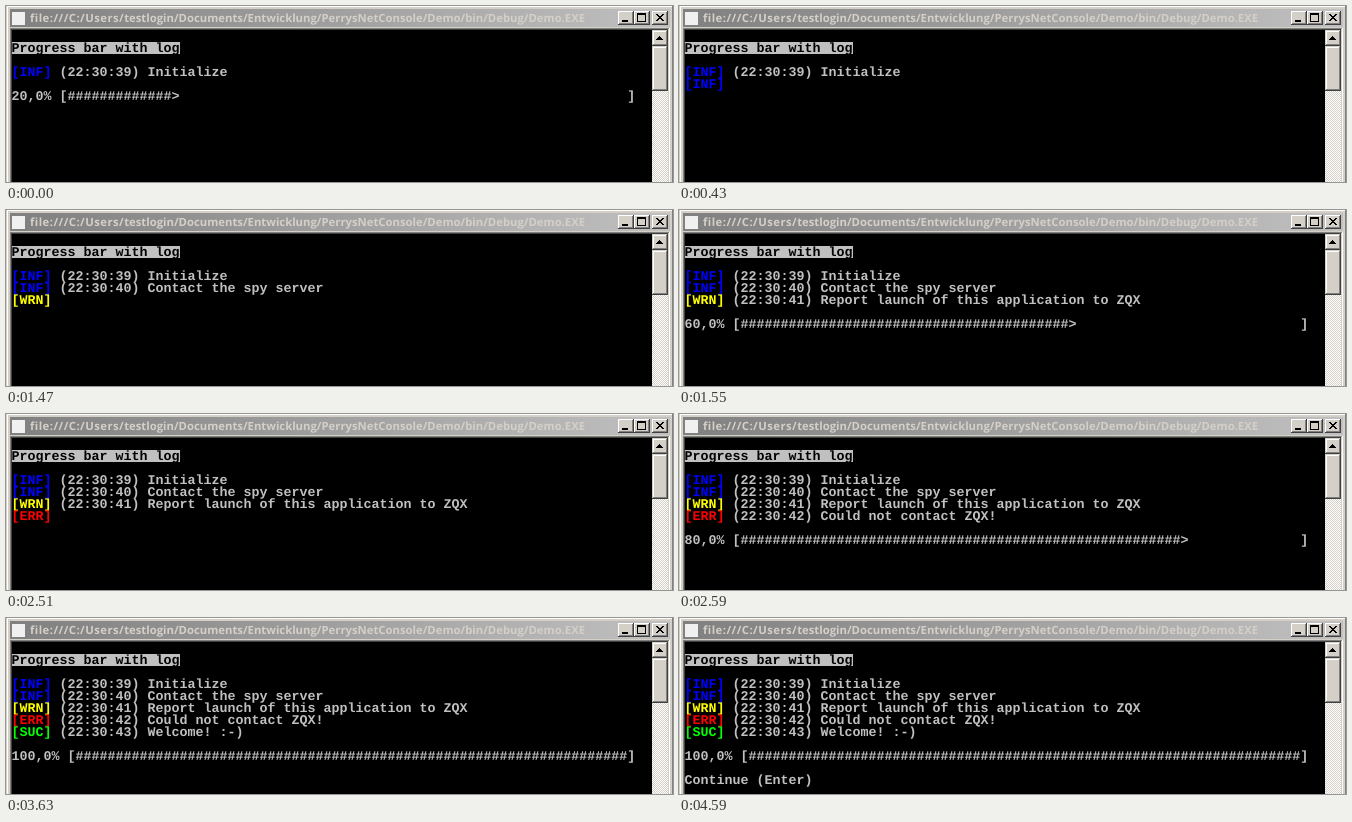
Recreate the animation shown at these times as an HTML page. Size 667 by 176 pixels, loop 6510 ms.

```html
<!DOCTYPE html>
<html lang="en">
<head>
<meta charset="utf-8">
<title>Progress bar with log</title>
<style>
  html, body { margin: 0; width: 100%; height: 100%; overflow: hidden; background: #000; }
  svg { display: block; width: 667px; height: 176px; }
  rect, path { shape-rendering: crispEdges; }
  text { white-space: pre; text-rendering: geometricPrecision; }
  .caption { font: bold 11.3px "Open Sans", "Noto Sans", sans-serif; fill: #d4d0c8; }
  .scheme { letter-spacing: .45px; }
  .console { font: bold 13.333px "Liberation Mono", monospace; fill: #c0c0c0; }
</style>
</head>
<body>
<svg id="stage" viewBox="0 0 667 176">
  <defs>
    <linearGradient id="bar"><stop stop-color="#808080"/><stop offset="1" stop-color="#c0c0c0"/></linearGradient>
    <pattern id="track" width="2" height="2" patternUnits="userSpaceOnUse">
      <rect width="2" height="2" fill="#d4d0c8"/>
      <path d="M0 0h1v1h-1zM1 1h1v1h-1z" fill="#fff"/>
    </pattern>
  </defs>
  <g id="chrome"></g>
  <text class="caption" x="24" y="16"><tspan class="scheme">file:///C:/Users/</tspan>testlogin/Documents/Entwicklung/PerrysNetConsole/Demo/bin/Debug/Demo.EXE</text>
  <g id="console" class="console"></g>
</svg>
<script>
const LOOP = 6510, TAG_ONLY = 80, PROMPT_AT = 4590;
const CELL = 8, LINE = 12, LEFT = 6, TOP = 24;
const BAR_END = 77;
const FACE = "#d4d0c8", LIGHT = "#fff", SHADOW = "#808080", DARK = "#404040", INK = "#000";
const LOGS = [
  { at: -TAG_ONLY, tag: "INF", color: "#00f", text: "Initialize" },
  { at: 430, tag: "INF", color: "#00f", text: "Contact the spy server" },
  { at: 1470, tag: "WRN", color: "#ff0", text: "Report launch of this application to ZQX" },
  { at: 2510, tag: "ERR", color: "#f00", text: "Could not contact ZQX!" },
  { at: 3550, tag: "SUC", color: "#0f0", text: "Welcome! :-)" }
];

const chrome = document.getElementById("chrome");
const screen = document.getElementById("console");

function add(parent, name, attrs) {
  const node = document.createElementNS("http://www.w3.org/2000/svg", name);
  for (const key in attrs) node.setAttribute(key, attrs[key]);
  return parent.appendChild(node);
}

function box(x, y, width, height, fill) {
  add(chrome, "rect", { x, y, width, height, fill });
}

// Raised control: two bevel lines on each side, from the outside in
function button(x, y, w, h, outer, inner) {
  box(x, y, w, h, DARK);
  box(x, y, w - 1, h - 1, outer);
  box(x + 1, y + 1, w - 2, h - 2, SHADOW);
  box(x + 1, y + 1, w - 3, h - 3, inner);
  box(x + 2, y + 2, w - 4, h - 4, FACE);
}

function drawFrame() {
  box(0, 0, 667, 176, FACE);
  box(1, 0, 665, 1, LIGHT);
  box(1, 0, 1, 176, LIGHT);
  box(666, 0, 1, 176, SHADOW);
  box(4, 3, 660, 18, "url(#bar)");
  box(4, 22, 659, 1, SHADOW);
  box(4, 22, 1, 154, SHADOW);
  box(5, 23, 657, 1, DARK);
  box(5, 23, 1, 153, DARK);
  box(663, 22, 1, 154, LIGHT);
  box(6, 24, 640, 152, INK);
}

function drawCaptionControls() {
  box(6, 6, 13, 13, "#f0f0f0");
  for (const x of [612, 628, 646]) button(x, 5, 16, 14, LIGHT, FACE);
  box(616, 14, 6, 2, INK);
  box(631, 7, 9, 9, INK);
  box(632, 9, 7, 6, FACE);
  for (let i = 0; i < 7; i++) {
    box(650 + i, 8 + i, 2, 1, INK);
    box(656 - i, 8 + i, 2, 1, INK);
  }
}

function drawScrollbar() {
  box(646, 24, 16, 152, "url(#track)");
  button(646, 24, 16, 16, FACE, LIGHT);
  for (let i = 0; i < 4; i++) box(653 - i, 30 + i, 1 + 2 * i, 1, INK);
  button(646, 40, 16, 45, FACE, LIGHT);
}

function baseline(row) {
  return TOP + row * LINE + 10;
}

function addText(row, col = 0, text = "", color = "") {
  const node = add(screen, "text", { x: LEFT - 0.5 + col * CELL, y: baseline(row) });
  node.style.fill = color;
  node.textContent = text;
  return node;
}

function progressLine(done) {
  const complete = done === LOGS.length;
  const head = `${done * 20},0% [`;
  const fill = complete ? "#".repeat(BAR_END - head.length) : "#".repeat(done * 14 - 1) + ">";
  return (head + fill).padEnd(BAR_END) + "]";
}

drawFrame();
drawCaptionControls();
drawScrollbar();
add(screen, "rect", { x: LEFT, y: TOP + LINE, width: 21 * CELL, height: LINE, fill: "#c0c0c0" });
addText(1, 0, "Progress bar with log", INK);

const lines = LOGS.map((log, i) => ({
  tag: addText(3 + i, 0, `[${log.tag}]`, log.color),
  message: addText(3 + i, 6, `(22:30:${39 + i}) ${log.text}`)
}));
const progress = addText(0);
const prompt = addText(11, 0, "Continue (Enter)");

function show(node, visible) {
  node.style.visibility = visible ? "visible" : "hidden";
}

function render(time) {
  const t = time % LOOP;
  let tags = 0, messages = 0;
  LOGS.forEach((log, i) => {
    const tagged = t >= log.at, written = t >= log.at + TAG_ONLY;
    show(lines[i].tag, tagged);
    show(lines[i].message, written);
    tags += tagged;
    messages += written;
  });
  show(progress, tags === messages);
  progress.setAttribute("y", baseline(4 + messages));
  progress.textContent = progressLine(messages);
  show(prompt, t >= PROMPT_AT);
}

const start = performance.now();
function tick() {
  render(performance.now() - start);
  requestAnimationFrame(tick);
}
tick();
</script>
</body>
</html>
```
